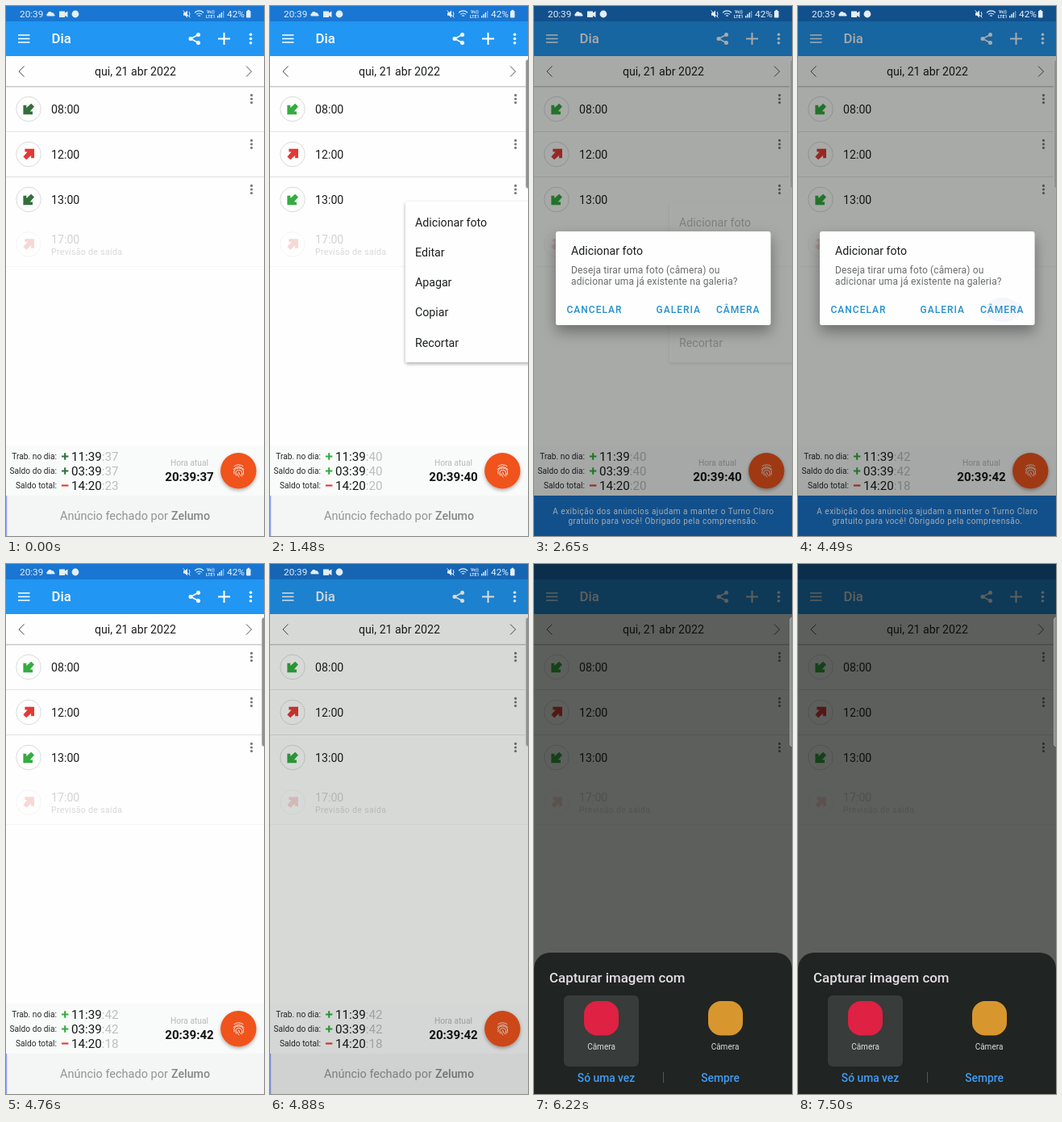
An HTML page that plays this animation: 320 px wide and 656 px high, repeating every 7800 ms.

```html
<!DOCTYPE html>
<html lang="pt">
<head>
<meta charset="utf-8">
<title>Registro do dia</title>
<style>
html, body { margin: 0; width: 100%; height: 100%; overflow: hidden; background: #fdfefd; }
svg { display: block; width: 100vw; height: 100vh; }
text { font-family: Roboto, Arial, sans-serif; white-space: pre; }
.main { font-size: 14.2px; fill: #1d1f1f; }
.label { font-size: 10.2px; fill: #262828; text-anchor: end; }
.total { font-size: 15.2px; fill: #161818; }
.mid { text-anchor: middle; }
.medium { font-weight: 500; }
.button { font-size: 12px; font-weight: 500; letter-spacing: 1px; fill: #2590cf; }
.body { font-size: 12px; letter-spacing: .15px; fill: #6a6c6c; }
.note { font-size: 10px; letter-spacing: .5px; fill: #fff; text-anchor: middle; }
.choice { font-size: 13.8px; font-weight: 500; fill: #409cf4; text-anchor: middle; }
.app { font-size: 10px; fill: #dcdedc; text-anchor: middle; }
</style>
</head>
<body>
<svg id="stage" viewBox="0 0 320 656" preserveAspectRatio="none"></svg>
<script>
const LOOP = 7800;
const GREEN = '#34ac40', RED = '#e53935', DARK_GREEN = '#33703c';

const text = (x, y, str, cls, extra = '') =>
  `<text x="${x}" y="${y}" class="${cls}" ${extra}>${str}</text>`;
const rect = (x, y, w, h, fill, extra = '') =>
  `<rect x="${x}" y="${y}" width="${w}" height="${h}" fill="${fill}" ${extra}/>`;
const circle = (x, y, r, fill, extra = '') =>
  `<circle cx="${x}" cy="${y}" r="${r}" fill="${fill}" ${extra}/>`;
const line = (d, color, width, extra = '') =>
  `<path d="${d}" fill="none" stroke="${color}" stroke-width="${width}" ${extra}/>`;
const dots = (x, y, gap, r, fill) =>
  [-1, 0, 1].map(i => circle(x, y + i * gap, r, fill)).join('');

function arrow(y, inward) {
  const look = inward ? 'class="in"' : `fill="${RED}"`;
  return `<path ${look} transform="translate(28.2 ${y}) rotate(${inward ? 180 : 0})"
    d="M-4.800-6.800H6.800V4.800H2.900V1.600L-3 6.800-6.800 3-1.600-2.900H-4.800z"/>`;
}

function row(i, time, inward) {
  const y = 127.5 + 56 * i;
  return circle(28, y, 15.3, '#fdfefd', 'stroke="#d9dbdb"') + arrow(y, inward) +
    text(56, y + 5.2, time, 'main') + dots(304.5, y - 12.5, 4.6, 1.6, '#787a7a') +
    (i < 2 ? rect(0, y + 27.5, 320, 1, '#e2e4e4') : '');
}

function total(i, label, sign) {
  const y = 557.5 + 18 * i, plus = sign === '+';
  return text(63, y + 3.8, label, 'label') +
    line(`M69 ${y}h8.4${plus ? `M73.2 ${y - 4.2}v8.4` : ''}`, plus ? GREEN : RED, 2.1,
      plus ? 'class="plus"' : '') +
    `<text x="81" y="${y + 5.4}" class="total"><tspan class="hm"></tspan><tspan class="sec" fill="#bcbebe"></tspan></text>`;
}

const statusIcons = `<g id="status" fill="#e4eef8">
  ${text(17, 14, '20:39', '', 'font-size="11.8"')}
  <path d="M51 12.5a2 2 0 0 1 .5-3.3 3 3 0 0 1 5.3-1 2.600 2.600 0 0 1 3 2.300 1.200 1.200 0 0 1 .4 2z"/>
  <path d="M66 6.500h7v2l3.500-2v7.500l-3.500-2v2h-7z"/>
  ${circle(86, 10, 4.4, '#e4eef8')}
  <path d="M220 8.300h2l3-2.800v9l-3-2.800h-2z"/>
  ${line('M219.500 5.500l9 9M227 7q2 3 0 6', '#e4eef8', 1)}
  ${line('M234 8.200q5.500-4.600 11 0M236 10.400q3.500-2.800 7 0M238 12.400q1.500-1.200 3 0', '#e4eef8', 1.2)}
  ${text(249, 9, 'Vo))', '', 'font-size="5.2" font-weight="700"')}
  ${text(248, 14.5, 'LTE1', '', 'font-size="5.2" font-weight="700"')}
  ${[0, 1, 2, 3].map(i => rect(262 + 2.3 * i, 12 - 2 * i, 1.4, 2.5 + 2 * i, '#e4eef8', i > 2 ? 'opacity=".5"' : '')).join('')}
  ${text(274, 14, '42%', '', 'font-size="11.8"')}
  ${rect(298, 6, 5.5, 8.5, '#e4eef8', 'rx="1"')}${rect(299.5, 4.8, 2.5, 1.5, '#e4eef8')}
</g>`;

const header = rect(0, 0, 320, 19, '#1976d2') + rect(0, 19, 320, 43, '#2196f3') +
  line('M15 36h14.500M15 40.500h14.500M15 45h14.500', '#fff', 1.6) +
  text(56.5, 46.4, 'Dia', 'medium', 'font-size="16.8" fill="#fff"') +
  line('M238.500 35.500L229 40.500l9.500 5', '#fff', 1.5) +
  circle(238.5, 35.5, 2.5, '#fff') + circle(229, 40.5, 2.5, '#fff') + circle(238.5, 45.5, 2.5, '#fff') +
  line('M263 40.500h15M270.500 33v15', '#fff', 2) + dots(303.5, 40.5, 5.3, 1.8, '#fff') +
  rect(0, 99, 320, 1.5, '#c9cbcb') +
  line('M22.500 74.500L16 81l6.500 6.500M298 74.500l6.500 6.500-6.500 6.500', '#3c3e3e', .9) +
  text(160.5, 86.2, 'qui, 21 abr 2022', 'main mid');

const forecast = `<g opacity=".19">${circle(28, 295, 15.3, 'none', 'stroke="#c9cbcb"')}${arrow(295, false)}</g>` +
  text(56, 293.5, '17:00', 'main', 'style="fill:#d2d3d3"') +
  text(56, 308, 'Previsão de saída', '', 'font-size="10.5" letter-spacing=".35" fill="#d7d8d8"') +
  rect(0, 322, 320, 1, '#f4f5f5');

const fab = circle(288.3, 575.3, 22.2, '#f0521c', 'filter="url(#soft)"') +
  line('M283 569.500q5.500-3.500 11 0M282 573.500q6.500-6.500 13 0M283 579q-1.500-7 5.500-7t6 6.500M285.500 581q-2-6.500 3-6.500t4 5.500q2 .8 2.500-.5M288.500 577q.5 4 4 5M287 579q.5 2.500 2 4', '#fbe3da', 1, 'stroke-linecap="round"');

const footer = rect(0, 544, 320, 62, '#f9fbfa') +
  total(0, 'Trab. no dia:', '+') + total(1, 'Saldo do dia:', '+') + total(2, 'Saldo total:', '-') +
  text(227.5, 569, 'Hora atual', 'mid', 'font-size="10.2" fill="#b6b8b8"') +
  '<text id="now" x="227.5" y="588" class="mid" font-size="15.1" font-weight="700" fill="#111313"></text>' +
  fab + rect(0, 606, 320, 50, '#f4f5f5') + rect(0, 606, 1.2, 50, '#8c9ff0') +
  text(67, 636, 'Anúncio fechado por', '', 'font-size="14.5" fill="#929494"') +
  text(205, 636, 'Zelumo', 'medium', 'font-size="14.2" fill="#858787"') +
  `<g id="notice">${rect(0, 606, 320, 50, '#1976d2')}
    ${text(160.5, 629, 'A exibição dos anúncios ajudam a manter o Turno Claro', 'note')}
    ${text(160.5, 641, 'gratuito para você! Obrigado pela compreensão.', 'note')}</g>`;

const menu = `<g id="menu">${rect(168, 242, 156, 199, '#fdfefd', 'rx="2" filter="url(#soft)"')}
  <rect id="press" x="168" y="249" width="152" height="37" fill="#000" opacity="0"/>
  ${['Adicionar foto', 'Editar', 'Apagar', 'Copiar', 'Recortar'].map((s, i) =>
    text(180, 272.5 + 37.25 * i, s, 'main')).join('')}</g>`;

const dialog = `<g id="dialog">${rect(27, 279, 266.5, 116, '#fdfefd', 'rx="3" filter="url(#deep)"')}
  <ellipse id="ripple" cx="254" cy="376" rx="22" ry="15" fill="#f5f6fb"/>
  ${text(46, 307.8, 'Adicionar foto', 'main')}
  ${text(46, 331, 'Deseja tirar uma foto (câmera) ou', 'body')}
  ${text(46, 345, 'adicionar uma já existente na galeria?', 'body')}
  ${text(40.5, 380, 'CANCELAR', 'button')}${text(151.5, 380, 'GALERIA', 'button')}${text(226, 380, 'CÂMERA', 'button')}</g>`;

const sheet = `<g id="sheet">${rect(0, 481, 320, 220, '#202422', 'rx="20"')}
  ${text(19, 518, 'Capturar imagem com', 'medium', 'font-size="16.9" fill="#e4dde4"')}
  ${rect(37, 534, 93, 88, '#383c3a', 'rx="6"')}
  ${rect(62, 541, 43, 42.5, '#df2143', 'rx="16"')}${rect(216, 541, 43, 42.5, '#d8972e', 'rx="16"')}
  ${text(83.5, 601, 'Câmera', 'app')}${text(237, 601, 'Câmera', 'app')}
  ${text(89.5, 641, 'Só uma vez', 'choice')}${text(231, 641, 'Sempre', 'choice')}
  ${rect(160, 629, 1, 13, '#555957')}</g>`;

const stage = document.getElementById('stage');
stage.innerHTML = `<defs>
  <filter id="soft" x="-20%" y="-20%" width="140%" height="140%"><feDropShadow dx="0" dy="2" stdDeviation="2" flood-opacity=".32"/></filter>
  <filter id="deep" x="-20%" y="-30%" width="140%" height="180%"><feDropShadow dx="0" dy="8" stdDeviation="9" flood-opacity=".36"/></filter>
  </defs>` + rect(0, 0, 320, 656, '#fdfefd') + header +
  row(0, '08:00', true) + row(1, '12:00', false) + row(2, '13:00', true) + forecast + footer + menu +
  rect(0, 0, 320, 656, '#040703', 'id="dim"') + statusIcons +
  rect(317.5, 66.5, 6, 159, '#8f9191', 'id="handle" rx="2.5" stroke="#b2b4b3" stroke-width=".8"') +
  dialog + sheet;

const $ = id => document.getElementById(id);
const all = cls => [...stage.querySelectorAll('.' + cls)];
const parts = { hm: all('hm'), sec: all('sec'), greens: all('in'), plus: all('plus') };
const fade = (id, value) => $(id).setAttribute('opacity', value);
const shift = (id, y) => $(id).setAttribute('transform', `translate(0 ${y})`);

// Each step overrides part of the state and holds until the next.
const steps = [
  [0, { sec: 37, menu: 0, press: 0, dialog: 0, dim: 0, ripple: 0, notice: 0, sheet: 0, drop: 175, lift: 0, handle: 0, green: DARK_GREEN }],
  [100, { handle: 1, green: GREEN }],
  [200, { sec: 38 }],
  [680, { sec: 39 }],
  [1230, { sec: 40 }],
  [1310, { menu: .35 }],
  [1400, { menu: .8 }],
  [1480, { menu: 1 }],
  [2410, { press: .07 }],
  [2530, { menu: .8, dim: .17, dialog: .45, notice: 1 }],
  [2650, { menu: .28, press: 0, dim: .34, dialog: 1 }],
  [2770, { menu: 0 }],
  [3470, { sec: 41 }],
  [4140, { sec: 42 }],
  [4490, { ripple: 1 }],
  [4570, { dialog: .6, dim: .24 }],
  [4640, { dialog: .2, dim: .1, notice: 0 }],
  [4760, { dialog: 0, dim: 0, ripple: 0 }],
  [4880, { dim: .15 }],
  [4980, { dim: .4, sheet: .35, drop: 110 }],
  [5080, { dim: .655, sheet: .82, drop: 41, lift: 3.5 }],
  [5180, { dim: .64, sheet: .97, drop: 9, lift: 11 }],
  [5280, { sheet: 1, drop: 0, lift: 20 }]
];

function draw(t) {
  const s = Object.assign({}, ...steps.filter(([at]) => at <= t).map(([, change]) => change));
  ['menu', 'press', 'dialog', 'dim', 'ripple', 'notice', 'sheet', 'handle'].forEach(id => fade(id, s[id]));
  shift('sheet', s.drop);
  shift('status', -s.lift);
  ['11:39', '03:39', '14:20'].forEach((time, i) => {
    parts.hm[i].textContent = time;
    parts.sec[i].textContent = ':' + (i < 2 ? s.sec : 60 - s.sec);
  });
  $('now').textContent = '20:39:' + s.sec;
  parts.greens.forEach(el => el.setAttribute('fill', s.green));
  parts.plus.forEach(el => el.setAttribute('stroke', s.green));
}

const start = performance.now();
function tick() {
  draw((performance.now() - start) % LOOP);
  requestAnimationFrame(tick);
}
tick();
</script>
</body>
</html>
```
